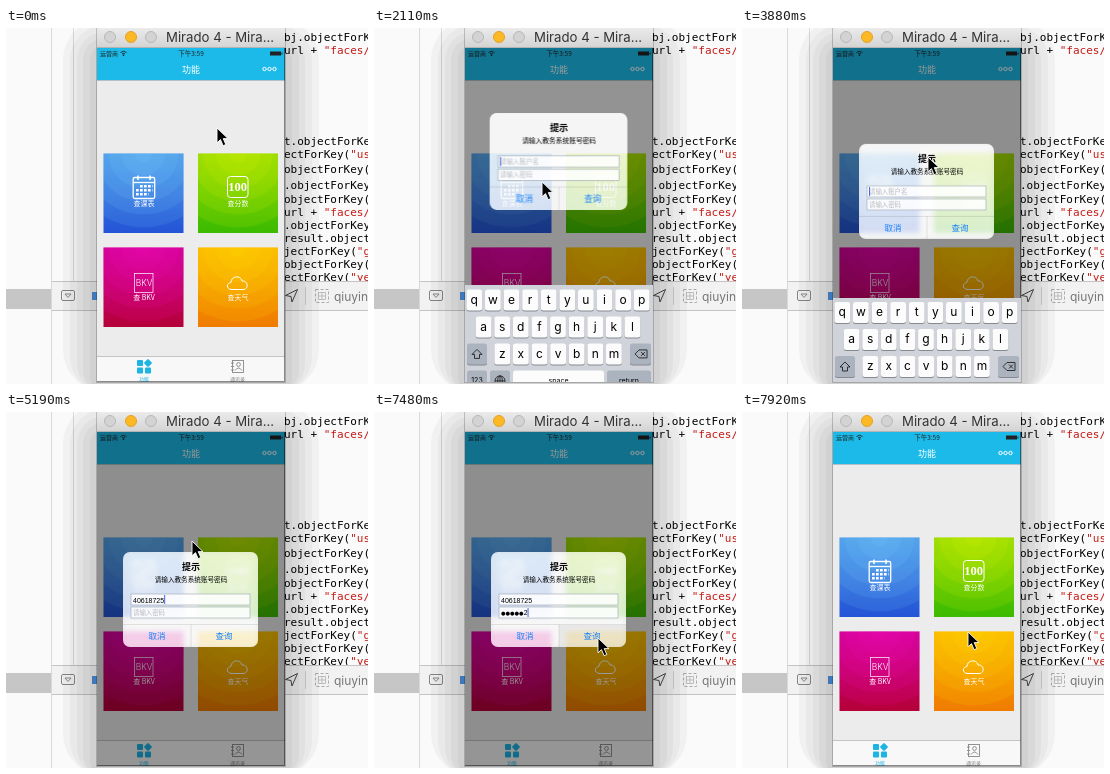
Animation of 362x356 px, one loop 8000 ms. Source, as an HTML page:

```html
<!DOCTYPE html>
<html lang="zh">
<head>
<meta charset="utf-8">
<title>功能</title>
<style>
  html, body { margin: 0; width: 100%; height: 100%; overflow: hidden; background: #fafafa; }
  svg { position: absolute; left: 0; top: 0; overflow: visible; }
  text { font-family: "Noto Sans CJK SC", "Noto Sans CJK", sans-serif; }
  .mid { text-anchor: middle; }
  .code text { font: 11px "DejaVu Sans Mono", monospace; white-space: pre; }
  .code tspan { fill: #c41a16; }
  .latin text, text.latin { font-family: Inter, Roboto, sans-serif; }
  .label text { font-size: 7px; fill: #fff; text-anchor: middle; }
  .label .score { font: bold 12.5px "Liberation Serif", serif; }
  .label .exam { font-size: 8.5px; font-weight: 300; }
  .line { fill: none; stroke: #fff; stroke-width: 1; }

  #stage { position: absolute; left: 0; top: 0; width: 362px; height: 356px; overflow: hidden; }
  #screen { position: absolute; left: 91px; top: 20px; width: 188px; height: 334px; overflow: hidden; }
  #dim { position: absolute; inset: 0; background: #000; opacity: 0; animation: dim 8s linear infinite; }
  #keyboard { position: absolute; left: 0; top: 227px; width: 188px; height: 107px; background: #d0d4da;
    animation: keyboard 8s infinite; }
  #keyboard text { font-size: 12px; text-anchor: middle; }
  #alert { position: absolute; left: 26px; top: 66px; width: 135px; height: 95px; border-radius: 7px;
    overflow: hidden; background: rgba(255, 255, 255, .8); opacity: 0; animation: alert 8s infinite; }
  #alert .hint { font-size: 6.4px; fill: #b9b9be; }
  #alert .digits { font: 7px "Liberation Sans", Arial, sans-serif; }
  #alert .dots { font: 5.2px "DejaVu Sans", sans-serif; }
  #press { opacity: 0; animation: press 8s step-end infinite; }
  #cursor { animation: cursor 8s linear infinite; }

  @keyframes dim {
    0%, 25.2% { opacity: 0; }
    25.25% { opacity: .2; }
    26.375% { opacity: .38; }
    28%, 94.4% { opacity: .4; }
    97.8%, 100% { opacity: 0; }
  }
  @keyframes keyboard {
    0%, 25.2% { transform: translateY(107px); animation-timing-function: linear; }
    25.25% { transform: translateY(66px); animation-timing-function: linear; }
    26.375% { transform: translateY(10.5px); animation-timing-function: ease-out; }
    29%, 47.1% { transform: none; animation-timing-function: ease-in-out; }
    51.5%, 100% { transform: translateY(107px); }
  }
  @keyframes alert {
    0%, 25.2% { opacity: 0; transform: scale(1.15); backdrop-filter: blur(0px) brightness(1.5); }
    25.25% { opacity: .6; transform: scale(1.1); backdrop-filter: blur(0px) brightness(1.5); }
    26.375% { opacity: 1; transform: scale(1.02); backdrop-filter: blur(.6px) brightness(1.4); }
    28%, 47.1% { opacity: 1; transform: none; backdrop-filter: blur(2.5px) brightness(1.5); }
    51.5%, 94.4% { opacity: 1; transform: translateY(54px); backdrop-filter: blur(2.5px) brightness(1.5); }
    97.8%, 100% { opacity: 0; transform: translateY(54px); backdrop-filter: blur(2.5px) brightness(1.5); }
  }
  @keyframes press { 0% { opacity: 0; } 92.3% { opacity: .06; } 94.5% { opacity: 0; } }
  @keyframes cursor {
    0%, .6% { transform: translate(211px, 100px); }
    5.6%, 7.2% { transform: translate(213px, 195px); }
    9.5% { transform: translate(251px, 222px); }
    11.5% { transform: translate(246px, 270px); }
    13.8% { transform: translate(170px, 266px); }
    15.5% { transform: translate(128px, 228px); }
    16.5% { transform: translate(142px, 160px); }
    17.4%, 17.8% { transform: translate(165px, 186px); }
    20% { transform: translate(158px, 140px); }
    23%, 24.8% { transform: translate(147px, 149px); }
    26.3% { transform: translate(168px, 154px); }
    33%, 34.2% { transform: translate(171px, 146px); }
    38.4%, 66.3% { transform: translate(186px, 129px); }
    74.7%, 76.2% { transform: translate(153px, 200px); }
    77%, 85.4% { transform: translate(144px, 199px); }
    89%, 94.4% { transform: translate(224px, 226px); }
    98%, 99.99% { transform: translate(226px, 220px); }
    100% { transform: translate(211px, 100px); }
  }
</style>
</head>
<body>
<div id="stage">
  <svg width="362" height="356">
    <defs>
      <linearGradient id="bar" x2="0" y2="1"><stop stop-color="#ebebeb"/><stop offset="1" stop-color="#d3d3d3"/></linearGradient>
      <linearGradient id="blue" x2="0" y2="1"><stop stop-color="#3f8fe2"/><stop offset="1" stop-color="#2454d6"/></linearGradient>
      <linearGradient id="green" x2="0" y2="1"><stop stop-color="#7fd400"/><stop offset="1" stop-color="#3cbb00"/></linearGradient>
      <linearGradient id="pink" x2="0" y2="1"><stop stop-color="#c4008e"/><stop offset="1" stop-color="#b60038"/></linearGradient>
      <linearGradient id="orange" x2="0" y2="1"><stop stop-color="#f8ae00"/><stop offset="1" stop-color="#f07c00"/></linearGradient>
      <symbol id="rings" viewBox="0 0 80 79.5">
        <g id="ripples" fill-opacity=".11"></g>
      </symbol>
    </defs>

    <!-- editor behind the window -->
    <path d="M45.5 0V356M67.5 0V253" stroke="#d9d9d9"/>
    <g class="code" id="code"></g>
    <path d="M0 261H45V281H0Z" fill="#c6c6c6"/>
    <path d="M46 253H362V282H46Z" fill="#f2f2f2"/>
    <path d="M46 253.5H362M46 282.5H362" stroke="#c4c4c4"/>
    <g fill="none" stroke="#858585">
      <rect x="55.5" y="262.5" width="13" height="10" rx="1.5"/>
      <path d="M59 266H65L62 269.5Z"/>
      <path d="M299.5 259V277" stroke="#ccc"/>
      <path d="M291.5 261.5L279.5 267.5L285 268.5L286 274Z" stroke="#444"/>
      <rect x="309.5" y="261.5" width="13" height="13" stroke="#aaa" stroke-dasharray="3 2"/>
      <path d="M312.5 264.5H319.5V271.5H312.5ZM312.5 268H319.5M316 264.5V271.5" stroke="#bbb"/>
    </g>
    <path d="M86 264H91V272H86Z" fill="#4a90e2"/>
    <text class="latin" x="328" y="273" font-size="12" fill="#777">qiuyin</text>
    <g id="shadow" fill-opacity=".035"></g>

    <!-- window frame -->
    <path d="M90 0H280V355H90Z" fill-opacity=".2"/>
    <path d="M91 0H279V20H91Z" fill="url(#bar)"/>
    <path d="M91 19H279V20H91Z" fill="#b4b4b4"/>
    <g fill="#d3d3d3" stroke="#b8b8b8">
      <circle cx="104" cy="9" r="5.5"/>
      <circle cx="125" cy="9" r="5.5" fill="#fdb924" stroke="#e2a02a"/>
      <circle cx="145" cy="9" r="5.5"/>
    </g>
    <text class="latin" x="160" y="14" font-size="13.2" fill="#333">Mirado 4 - Mira...</text>

    <!-- app -->
    <path d="M91 20H279V354H91Z" fill="#ececec"/>
    <path d="M91 20H279V52H91Z" fill="#1cbae8"/>
    <path d="M91 52H279V53H91Z" fill="#b2c0c6"/>
    <g fill="#222" font-size="6">
      <text x="94" y="28">运营商</text>
      <text x="185" y="28" class="mid" font-size="6.5">下午3:59</text>
      <path d="M264 23.5H275V27.5H264ZM275.5 24.5H276.5V26.5H275.5Z"/>
    </g>
    <path d="M114.5 24.5Q117.5 22 120.5 24.5M116 26Q117.5 24.8 119 26" fill="none" stroke="#222" stroke-width=".9"/>
    <circle cx="117.5" cy="27.3" r=".7"/>
    <text x="185" y="45" class="mid" font-size="9" fill="#fff">功能</text>
    <g class="line"><circle cx="258.5" cy="41" r="1.7"/><circle cx="263.5" cy="41" r="1.7"/><circle cx="268.5" cy="41" r="1.7"/></g>

    <g id="tiles"></g>

    <g class="line">
      <rect x="127.2" y="149.5" width="21.5" height="21" rx="1.5" stroke-width="1.3"/>
      <path d="M127 154.5H149" stroke-width="1.3"/>
      <path d="M132 147.5V152M144 147.5V152" stroke-width="1.6"/>
      <path d="M134 158.3H146.5M130 162.3H146.5M130 166.3H142.5" stroke-width="2.5" stroke-dasharray="2.7 1.3"/>
      <rect x="221.5" y="148.5" width="20.5" height="21" rx="3"/>
      <rect x="128.5" y="245.5" width="18.5" height="19" stroke-width=".7"/>
      <path d="M226 261.5C220 261.5 220 255 225 254.5C225 247.5 235 247 236 253C242.5 252.5 243 261.5 237 261.5Z"/>
    </g>
    <g class="label">
      <text class="score" x="231.7" y="163.3">100</text>
      <text class="latin exam" x="138" y="258">BKV</text>
      <text x="138" y="177.5">查课表</text><text x="232" y="177.5">查分数</text>
      <text x="138" y="271.5">查 BKV</text><text x="232" y="271.5">查天气</text>
    </g>

    <path d="M91 329H279V354H91Z" fill="#f8f8f8"/>
    <path d="M91 328H279V329H91Z" fill="#c4c4c4"/>
    <g fill="#1cb4e4">
      <rect x="131" y="332" width="6" height="6" rx="1"/><rect x="131" y="339.5" width="6" height="6" rx="1"/>
      <rect x="139" y="339.5" width="6" height="6" rx="1"/>
      <rect x="139" y="332" width="6" height="6" rx="1" transform="rotate(45 142 335)"/>
      <text x="138" y="352.5" class="mid" font-size="5">功能</text>
    </g>
    <g fill="none" stroke="#888" stroke-width=".9">
      <rect x="226.5" y="332.5" width="11" height="12"/>
      <circle cx="232.5" cy="336.5" r="1.9"/><path d="M229 342.5Q232.5 337.5 236 342.5M225 335H228M225 338.5H228M225 342H228"/>
    </g>
    <text x="231.5" y="352.5" class="mid" font-size="5" fill="#888">通讯录</text>
    <path d="M278.5 20V353.5H91" fill="none" stroke="#000" stroke-opacity=".45"/>
  </svg>

  <div id="screen">
    <div id="dim"></div>
    <div id="keyboard"><svg class="latin" width="188" height="107"></svg></div>
    <div id="alert">
      <svg width="135" height="95">
        <text x="68" y="18" class="mid" font-size="9" font-weight="bold">提示</text>
        <text x="68" y="29.5" class="mid" font-size="6.6">请输入教务系统账号密码</text>
        <g fill="#fff" fill-opacity=".85" stroke="#9aa5ad" stroke-width=".6">
          <rect x="8" y="42" width="119" height="11"/><rect x="8" y="55" width="119" height="11"/>
        </g>
        <path d="M0 72.5H135M68 72.5V95" stroke="#000" stroke-opacity=".14" stroke-width=".7"/>
        <rect id="press" x="68" y="73" width="67" height="22"/>
        <text id="userHint" class="hint" x="10" y="50">请输入账户名</text>
        <text id="passHint" class="hint" x="10" y="63">请输入密码</text>
        <text id="user" class="digits" x="10" y="50.5"></text>
        <text id="pass" class="digits" x="10" y="63.3"><tspan id="dots" class="dots"></tspan><tspan id="last"></tspan></text>
        <rect id="caret" width="1" height="9" fill="#4667e8"/>
        <g class="mid" font-size="8.5" font-weight="500" fill="#1680fb">
          <text x="34" y="87">取消</text><text x="101" y="87">查询</text>
        </g>
      </svg>
    </div>
  </div>

  <svg id="cursor" width="12" height="19"><path d="M0 0V14.8L3.5 11.6L6.1 17.7L8.8 16.5L6.2 10.6H11Z" stroke="#fff" stroke-width=".9"/></svg>
</div>

<script>
  const $ = id => document.getElementById(id);
  const rect = (x, y, w, h, rest) => `<rect x="${x}" y="${y}" width="${w}" height="${h}" ${rest}/>`;

  // Editor text: baseline, plain part, string part
  $('code').innerHTML = [
    [13, 'bj.objectForKey'], [26, 'url + ', '"faces/'], [117, 't.objectForKey'],
    [130, 'ectForKey(', '"user'], [145, 'objectForKey('], [161, '.objectForKey'],
    [175, 'objectForKey('], [188, 'url + ', '"faces/'], [201, '.objectForKey'],
    [214, 'result.objectFor'], [227, 'jectForKey(', '"g'], [240, 'objectForKey('],
    [253, 'ectForKey(', '"year']
  ].map(([y, plain, str = '']) => `<text x="278" y="${y}">${plain}<tspan>${str}</tspan></text>`).join('');

  $('shadow').innerHTML = [7, 14, 20, 27, 34]
    .map(d => rect(91 - d, 24 - d, 188 + 2 * d, 340 + d, `rx="${d + 8}"`)).join('');

  $('ripples').innerHTML = [9, 22, 35, 48, 61, 74].map(r => `<circle cx="40" r="${r}"/>`).join('');
  $('tiles').innerHTML = [
    ['blue', '#7fd0ff', 97.5, 125.5], ['green', '#e8f000', 192, 125.5],
    ['pink', '#ff10c0', 97.5, 219.5], ['orange', '#ffe000', 192, 219.5]
  ].map(([name, glow, x, y]) => rect(x, y, 80, 79.5, `fill="url(#${name})"`) +
    `<use href="#rings" x="${x}" y="${y}" width="80" height="79.5" fill="${glow}"/>`).join('');

  // Keyboard
  const key = (x, y, w, fill, label = '', size = 12) =>
    rect(x, y + 1, w, 21, 'rx="2.5" fill="#868a90"') + rect(x, y, w, 21, `rx="2.5" fill="${fill}"`) +
    `<text x="${x + w / 2}" y="${y + 10.5 + size * .33}" style="font-size:${size}px">${label}</text>`;
  const gray = '#abb3be';
  const letters = ['qwertyuiop', 'asdfghjkl', 'zxcvbnm'].map((row, r) =>
    [...row].map((c, i) => key([1.4, 10.7, 29.4][r] + i * 18.6, 4 + r * 27, 15.8, '#fcfcfc', c)).join('')).join('');
  document.querySelector('#keyboard svg').innerHTML = letters +
    key(2, 58, 20, gray) + key(165, 58, 21, gray) +
    key(2, 85, 20, gray, '123', 7) + key(25, 85, 20, gray) +
    key(48, 85, 91, '#fcfcfc', 'space', 7) + key(142, 85, 44, gray, 'return', 7) +
    `<g fill="none" stroke="#222" stroke-width=".9">
      <path d="M12 64L7 69H9.5V73H14.5V69H17Z"/>
      <path d="M170 68.5L174 64.5H182V72.5H174ZM176 66.5L180 70.5M180 66.5L176 70.5"/>
      <circle cx="35" cy="95.5" r="5"/><ellipse cx="35" cy="95.5" rx="2.3" ry="5"/><path d="M30 95.5H40M35 90.5V100.5"/>
    </g>`;

  // Typing
  const LOOP = 8000, FOCUS = 5980;
  const account = '40618725', secret = '538142';
  const userTimes = [4320, 4410, 4580, 4760, 4840, 4930, 5110, 5190];
  const passTimes = [6330, 6510, 6770, 6860, 6950, 7030];
  const count = (times, t) => times.filter(s => s <= t).length;

  function draw(t) {
    const typed = count(userTimes, t), n = count(passTimes, t);
    const masked = n === 2 && t >= 6590 ? 2 : Math.max(0, n - 1);
    $('user').textContent = account.slice(0, typed);
    $('dots').textContent = '●'.repeat(masked);
    $('last').textContent = secret.slice(masked, n);
    $('userHint').setAttribute('visibility', typed ? 'hidden' : 'inherit');
    $('passHint').setAttribute('visibility', n ? 'hidden' : 'inherit');
    const field = t >= FOCUS ? 'pass' : 'user';
    $('caret').setAttribute('x', 10 + $(field).getComputedTextLength());
    $('caret').setAttribute('y', field === 'pass' ? 56 : 43);
  }

  let start;
  function tick(now) {
    start ??= now;
    draw((now - start) % LOOP);
    requestAnimationFrame(tick);
  }
  requestAnimationFrame(tick);
</script>
</body>
</html>
```
